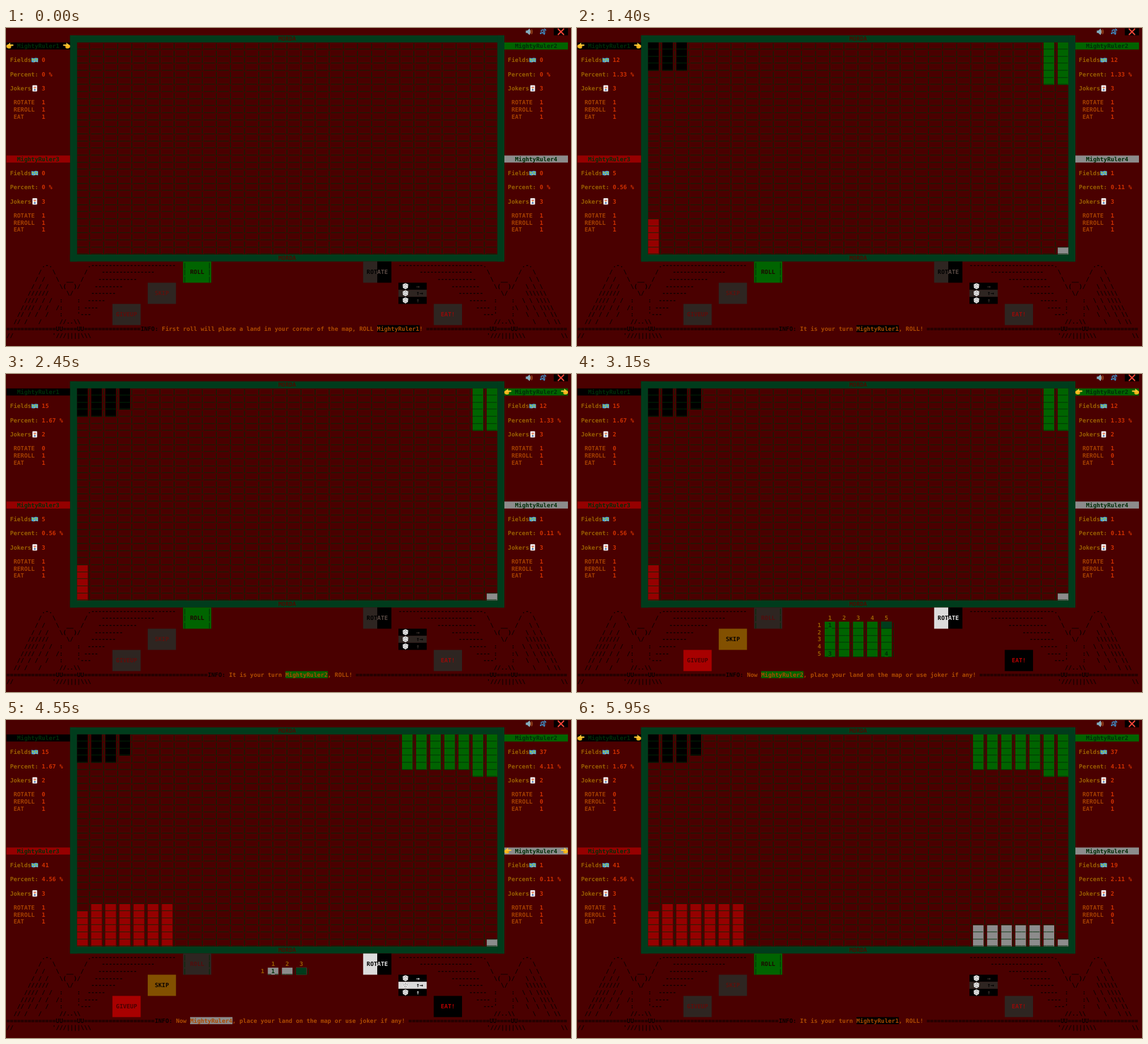
Animation, 933 px wide and 525 px high, one loop 6300 ms. Source, as an HTML page:

```html
<!DOCTYPE html>
<html lang="en">
<head>
<meta charset="utf-8">
<title>Land game</title>
<style>
  html, body { margin: 0; width: 100%; height: 100%; overflow: hidden; background: #4a0000; }
  svg { display: block; width: 100vw; height: 100vh; }
  text {
    font: bold 9.686px "DejaVu Sans Mono", monospace;
    white-space: pre;
    text-rendering: geometricPrecision;
  }
</style>
</head>
<body>
<svg viewBox="0 0 933 525" preserveAspectRatio="none">
  <defs>
    <g id="hand">
      <rect x="1" y="3" width="6.6" height="6.8" rx="2.2" fill="#f9b91e"/>
      <rect x="0" y="4.2" width="3" height="4.4" rx="1" fill="#f9b91e"/>
      <rect x="4" y="3.4" width="7.6" height="2.2" rx="1.1" fill="#ffcc3a"/>
      <path d="M3.2 4.4L5.6 1.6" stroke="#ffcc3a" stroke-width="1.7" stroke-linecap="round"/>
      <path d="M5 6.2h2.6M5 8h2.4" stroke="#d68a0c" stroke-width=".6"/>
    </g>
    <g id="map">
      <path d="M.4 2.2L4 2.8 7.6 2 11.4 2.6V9.4L7.6 8.8 4 9.6.4 9Z" fill="#4aa6d8"/>
      <path d="M1 3.4l3 .5 1 1.6-1.8 1.5-1.8-1ZM6.2 3.4l4.4.3-.6 2.4-2.4.8Z" fill="#8fb85a"/>
      <path d="M4.4 7.2l2.4.5-.8 1.2-1.6.3ZM8.4 7.4l2.2.3v.9l-2-.4Z" fill="#d8c25c"/>
    </g>
    <g id="card">
      <rect x="2" y=".6" width="7.8" height="10.4" rx="1" fill="#f2f2f2"/>
      <path d="M3.6 4.6L5 2.8 6 4 7.2 2.6 8.2 4.8Z" fill="#d43b3b"/>
      <circle cx="5.9" cy="5.6" r="1.2" fill="#e8b45a"/>
      <path d="M4.2 9.4L5.2 6.8H6.8L7.6 9.4Z" fill="#4a6fb8"/>
    </g>
    <g id="speaker">
      <path d="M.4 3.8H2.8L6.4.6V11L2.8 7.8H.4Z" fill="#82aec0"/>
      <path d="M6.4.6c1.8 1.2 1.8 9.2 0 10.4Z" fill="#b9e4ea"/>
      <path d="M8.4 3.4q1.6 2.4 0 4.8M9.8 1.8q2.6 4 0 8" fill="none" stroke="#b5622a" stroke-width="1.1"/>
    </g>
    <g id="notes" fill="#3f9ad8" stroke="#3f9ad8">
      <path d="M2.5 8V3.2L6 2.2V7M8.2 8.6V1.2l2.6 2.2" fill="none" stroke-width="1.3"/>
      <ellipse cx="1.7" cy="8.4" rx="1.1" ry=".8"/><ellipse cx="5.2" cy="7.4" rx="1.1" ry=".8"/>
      <ellipse cx="7.4" cy="9.2" rx="1.1" ry=".8"/>
    </g>
    <path id="cross" d="M1.4 1.2L10.4 10.2M10.4 1.2L1.4 10.2" stroke="#f04438" stroke-width="2.1" stroke-linecap="round"/>
    <g id="die">
      <path d="M5.8.8L10.4 2.8 9.8 8.4 5.8 10.8 1.6 8.4 1.2 2.8Z" fill="#ececec"/>
      <path d="M1.2 2.8L5.6 4.8 10.4 2.8M5.6 4.8L5.8 10.8" fill="none" stroke="#aaa" stroke-width=".6"/>
      <g fill="#555"><circle cx="5.8" cy="2.8" r=".7"/><circle cx="3" cy="5.4" r=".6"/><circle cx="4.3" cy="8" r=".6"/><circle cx="7.3" cy="8" r=".6"/><circle cx="8.7" cy="5.2" r=".6"/></g>
    </g>
  </defs>
  <g transform="translate(.8 .5)">
    <g id="back"></g>
    <g id="play"></g>
  </g>
</svg>
<script>
const COLS = 160, ROWS = 45, STEP = 350;
const W = 933 / COLS, H = 525 / ROWS;
const TITLE = "MORDA";
const names = [1, 2, 3, 4].map(n => "MightyRuler" + n);
const paint = ["#000", "#006400", "#960000", "#8c8c8c"];
const LINE = "#002d08", FIELD = "#003c1c", LABEL = "#9b5f00", VALUE = "#d03000",
      KIND = "#a54000", INK = "#080000", OFF = "#2e2521";

// [player, land width, land height]; no land means waiting for a roll
const steps = [
  [0], [1], [2], [3], [0], [0, 3, 1], [0, 1, 3], [1], [1, 2, 4], [1, 5, 5],
  [2], [2, 6, 6], [3], [3, 3, 1], [3, 6, 3], [3, 6, 3], [3, 6, 3], [0]
];
// [first step, player, column, row, width, height]
const lands = [
  [1, 0, 0, 0, 3, 4], [2, 1, 28, 0, 2, 6], [3, 2, 0, 25, 1, 5], [4, 3, 29, 29, 1, 1],
  [7, 0, 3, 0, 1, 3], [10, 1, 23, 0, 5, 5], [12, 2, 1, 24, 6, 6], [17, 3, 23, 27, 6, 3]
];
// [first step, player, joker]
const spent = [[6, 0, "ROTATE"], [9, 1, "REROLL"], [14, 3, "REROLL"]];

const art = String.raw`
          .-.          .------------------------
         /   \        /    ---------------
        / /   \  __  /    -----------
       / / /   \(  )/    --------
      //////     \/     -------
     //// / /  :    :  -----
    //// / /  /:    : ----
   // / /  /   :    '---
  // /   /     //..\\
`.split("\n").slice(1, -1);

const box = (c, r, w, h, fill) =>
  `<rect x="${c * W}" y="${r * H}" width="${w * W}" height="${h * H}" fill="${fill}"/>`;
const text = (c, r, s, fill) =>
  `<text x="${c * W}" y="${r * H + 9.1}" fill="${fill}">${s}</text>`;
const icon = (id, c, r) => `<use href="#${id}" x="${c * W}" y="${r * H}"/>`;
const flip = s => [...s].reverse().map(ch =>
  ({ "/": "\\", "\\": "/", "(": ")", ")": "(" })[ch] || ch).join("");

function backdrop() {
  let out = box(155, 0, 4, 1, "#000") + icon("speaker", 147, 0) + icon("notes", 151, 0) + icon("cross", 156, 0);
  art.forEach((s, i) => {
    out += text(0, 33 + i, s, INK) + text(159 - s.length, 33 + i, flip(s), INK);
  });
  const feet = String.raw`'///||||\\\ `;
  out += text(0, 43, "//", INK) + text(157, 43, "\\\\", INK);
  out += text(13, 43, feet, INK) + text(136, 43, feet, INK);
  // four border strips around the field
  out += box(18, 1, 123, 1, FIELD) + box(18, 32, 123, 1, FIELD);
  out += box(18, 1, 2, 32, FIELD) + box(139, 1, 2, 32, FIELD);
  return out + text(77, 1, TITLE, "#4a0c00") + text(77, 32, TITLE, "#4a0c00");
}

function panel(p, step, active) {
  const c = p % 2 ? 141 : 0, r = p < 2 ? 2 : 18;
  const fields = lands.reduce((n, l) => n + (l[1] === p && step >= l[0] ? l[4] * l[5] : 0), 0);
  let out = box(c, r, 18, 1, paint[p]) + text(c + 3, r, names[p], LINE);
  if (active) {
    out += icon("hand", c, r) +
      `<use href="#hand" transform="translate(${(c + 18) * W} ${r * H}) scale(-1 1)"/>`;
  }
  const share = fields ? (fields / 9).toFixed(2) : "0";
  const kinds = ["ROTATE", "REROLL", "EAT"];
  const left = kinds.map(k => jokers(p, k, step));
  out += text(c + 1, r + 2, "Fields", LABEL) + icon("map", c + 7, r + 2) + text(c + 10, r + 2, fields, VALUE);
  out += text(c + 1, r + 4, "Percent:", LABEL) + text(c + 10, r + 4, share + " %", VALUE);
  out += text(c + 1, r + 6, "Jokers", LABEL) + icon("card", c + 7, r + 6) +
    text(c + 10, r + 6, left[0] + left[1] + left[2], VALUE);
  kinds.forEach((k, i) => {
    out += text(c + 2, r + 8 + i, k, KIND) + text(c + 10, r + 8 + i, left[i], VALUE);
  });
  return out;
}

function jokers(p, kind, step) {
  return spent.some(s => step >= s[0] && s[1] === p && s[2] === kind) ? 0 : 1;
}

function board(step) {
  let out = "";
  for (const [from, p, x, y, w, h] of lands) {
    if (step < from) continue;
    for (let i = 0; i < w; i++) out += box(20 + 4 * (x + i), 2 + y, 3, h, paint[p]);
  }
  const row = "___|".repeat(30).slice(0, -1);
  for (let i = 0; i < 30; i++) out += text(20, 2 + i, row, LINE);
  return out;
}

function rolled(p, w, h) {
  const c = 79 - 2 * (w - 1);
  const corner = n => [n % 2 ? 0 : w - 1, n < 3 ? 0 : h - 1];
  const [sx, sy] = corner(p + 1);
  const marks = {};
  for (const n of [3, 1, 2, 4]) marks[corner(n)] = n;
  let out = "";
  for (let x = 0; x < w; x++) {
    out += text(c + 4 * x, 34, x + 1, LABEL) + box(c - 1 + 4 * x, 35, 3, h, paint[p]);
  }
  out += box(c - 1 + 4 * sx, 35 + sy, 3, 1, FIELD);
  for (let y = 0; y < h; y++) {
    let s = "";
    for (let x = 0; x < w; x++) {
      const chosen = x === sx && y === sy;
      s += `_${!chosen && marks[[x, y]] || "_"}_|`;
    }
    out += text(c - 3, 35 + y, y + 1, LABEL) + text(c - 1, 35 + y, s, LINE);
  }
  return out;
}

function buttons(p, step, placing) {
  const key = (c, r, pad, s, on, bg, ink, dim) =>
    box(c, r, 8, 3, on ? bg : OFF) + text(c + pad, r + 1, s, on ? ink : dim);
  let out = key(50, 33, 2, "ROLL", !placing, "#006400", "#1c0800", "#540c0c");
  for (let i = 0; i < 3; i++) out += text(50, 33 + i, "|      |", LINE);
  out += key(40, 36, 2, "SKIP", placing, "#825000", "#0c0400", "#5c120e");
  out += key(30, 39, 1, "GIVEUP", placing, "#a80000", "#4a0000", "#600c0a");
  out += key(121, 39, 2, "EAT!", placing, "#000", "#b40000", "#960a08");
  const light = placing ? "#dcdcdc" : OFF, pale = placing ? "#e6e6e6" : "#40342f";
  if (jokers(p, "ROTATE", step)) {
    out += box(101, 33, 4, 3, light) + box(105, 33, 4, 3, "#000");
    out += text(102, 34, "ROT", "#000") + text(105, 34, "ATE", placing ? pale : "#5a4a44");
  }
  if (jokers(p, "REROLL", step)) {
    ["→", "↑→", "↑"].forEach((s, i) => {
      const mid = i === 1;
      out += box(111, 36 + i, 8, 1, mid ? light : "#000") + icon("die", 112, 36 + i) +
        text(116, 36 + i, s, mid ? "#000" : pale);
    });
  }
  return out;
}

function info(p, step, placing) {
  const [before, after] = placing ? ["Now ", ", place your land on the map or use joker if any!"]
    : step < 4 ? ["First roll will place a land in your corner of the map, ROLL ", "!"]
    : ["It is your turn ", ", ROLL!"];
  const name = names[p];
  const size = 6 + before.length + name.length + after.length;
  const start = Math.floor(78 - size / 2), at = start + 6 + before.length;
  const rule = [..."=".repeat(159)].fill(" ", start, start + size + 1);
  for (const c of [14, 20, 137, 143]) rule[c] = rule[c + 1] = "U";
  return text(0, 42, rule.join(""), INK) + text(start, 42, "INFO:", INK) +
    box(at, 42, name.length, 1, paint[p]) +
    text(start + 6, 42, before + name + after, "#ad4a00");
}

function scene(step) {
  const [p, w, h] = steps[step];
  const placing = !!w;
  return names.map((_, i) => panel(i, step, i === p)).join("") + board(step) +
    buttons(p, step, placing) + (placing ? rolled(p, w, h) : "") + info(p, step, placing);
}

document.getElementById("back").innerHTML = backdrop();
const play = document.getElementById("play");
const scenes = steps.map((_, i) => scene(i));
let shown = -1;
const begin = performance.now();

function draw() {
  const step = Math.floor(Math.max(0, performance.now() - begin) / STEP) % steps.length;
  if (step !== shown) play.innerHTML = scenes[shown = step];
  requestAnimationFrame(draw);
}
draw();
</script>
</body>
</html>
```
